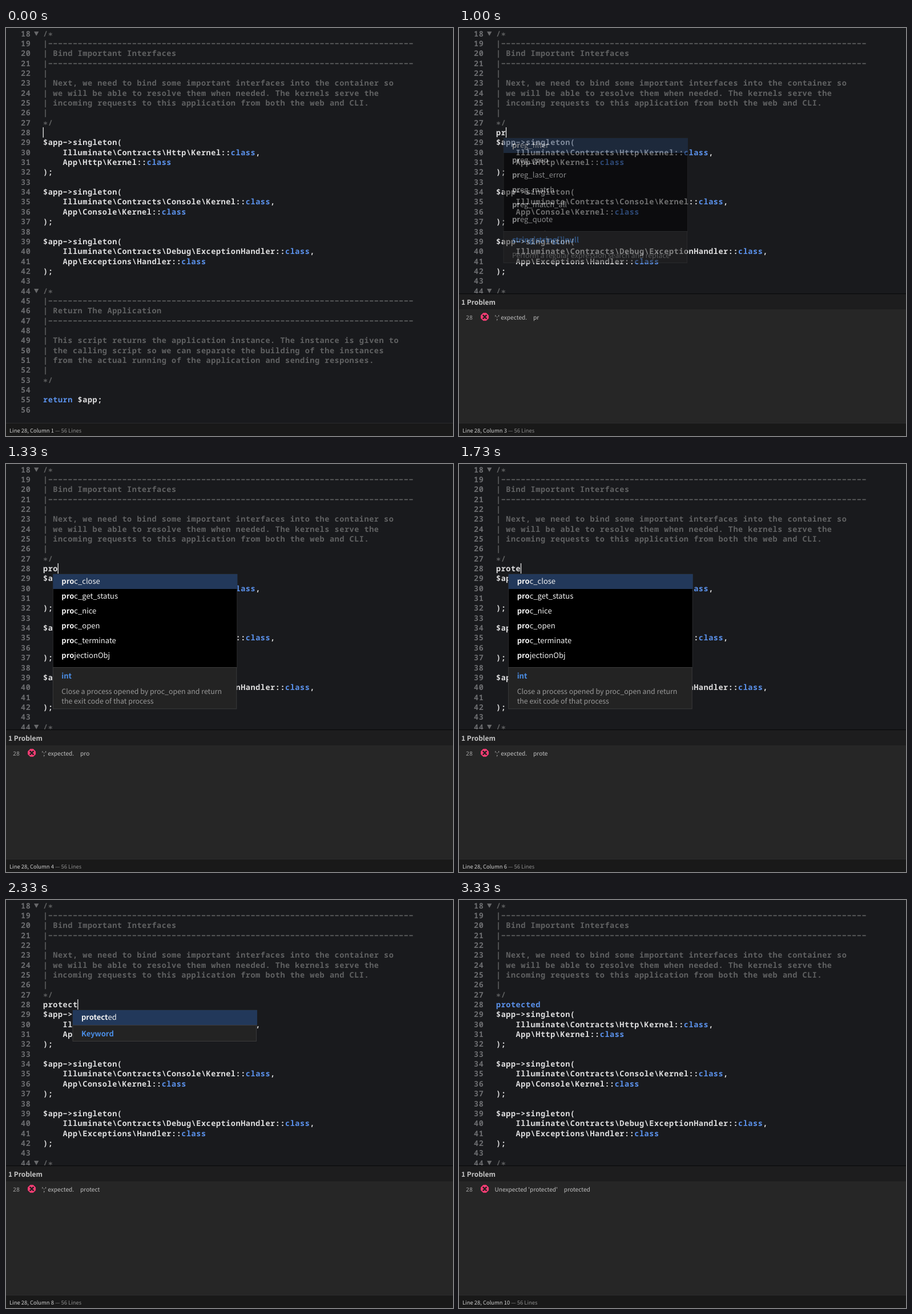
Recreate the animation shown at these times as an HTML page. Size 783x715 px, loop 3870 ms.

```html
<!DOCTYPE html>
<html lang="en">
<head>
<meta charset="utf-8">
<style>
  html, body { margin: 0; width: 100%; height: 100%; overflow: hidden; background: #191a1d; }
  svg { display: block; }
  text { white-space: pre; text-rendering: geometricPrecision; font-family: "Noto Sans CJK JP", "Noto Sans CJK SC", "Noto Sans", sans-serif; }
  .code { font: 600 13.5px "Noto Sans Mono", "DejaVu Sans Mono", monospace; letter-spacing: .554px; fill: #dededf; }
  .num { fill: #6c6d70; }
  .com { fill: #606162; }
  .key { fill: #5b92ec; }
  .item { font-size: 13px; fill: #f2f2f2; }
  .type { font-size: 13px; font-weight: 600; fill: #4a8ee6; }
  .doc { font-size: 12.36px; fill: #989898; }
  .head { font-size: 11.9px; font-weight: 600; fill: #c6c6c6; }
  .msg { font-size: 10.15px; fill: #c0c0c0; }
  .row { font: 10px "Noto Sans Mono", monospace; fill: #a0a0a0; }
  .stat { font-size: 9.43px; fill: #cfcfcf; }
  .dim { fill: #8c8c8c; }
  .b { font-weight: 700; }
</style>
</head>
<body>
<svg id="stage" width="783" height="715" viewBox="0 0 783 715">
  <g id="code"></g><g id="typed"></g><g id="panel"></g><g id="status"></g><g id="popup"></g>
</svg>
<script>
const LOOP = 3870, LEFT = 65, CHAR = 8.654, PITCH = 17.34, FIRST = 18;
const WORD = 'protected';
const rule = '|' + '-'.repeat(74);
const source = String.raw`/*
${rule}
| Bind Important Interfaces
${rule}
|
| Next, we need to bind some important interfaces into the container so
| we will be able to resolve them when needed. The kernels serve the
| incoming requests to this application from both the web and CLI.
|
*/

$app->singleton(
    Illuminate\Contracts\Http\Kernel::class,
    App\Http\Kernel::class
);

$app->singleton(
    Illuminate\Contracts\Console\Kernel::class,
    App\Console\Kernel::class
);

$app->singleton(
    Illuminate\Contracts\Debug\ExceptionHandler::class,
    App\Exceptions\Handler::class
);

/*
${rule}
| Return The Application
${rule}
|
| This script returns the application instance. The instance is given to
| the calling script so we can separate the building of the instances
| from the actual running of the application and sending responses.
|
*/

return $app;
`.split('\n');

const lists = {
  preg: {
    items: ['preg_filter', 'preg_grep', 'preg_last_error', 'preg_match', 'preg_match_all', 'preg_quote', 'preg_replace'],
    type: 'string|string[]|null',
    doc: ['Perform a regular expression search and replace']
  },
  proc: {
    items: ['proc_close', 'proc_get_status', 'proc_nice', 'proc_open', 'proc_terminate', 'projectionObj', 'property_exists'],
    type: 'int',
    doc: ['Close a process opened by proc_open and return', 'the exit code of that process']
  },
  word: { items: [WORD], type: 'Keyword', doc: [] }
};

// Each step changes part of the state: typed letters, reported letters, popup list, popup column, bold letters
const steps = [
  [0, { typed: 0, said: 0, list: '', at: 2, bold: 2, alpha: 1, caret: 1 }],
  [330, { caret: 0 }],
  [730, { typed: 1, caret: 1 }],
  [930, { typed: 2 }],
  [1000, { said: 2, list: 'preg', alpha: .5 }],
  [1070, { alpha: .9 }],
  [1130, { alpha: 1 }],
  [1270, { typed: 3 }],
  [1330, { said: 3, list: 'proc', at: 2.5, bold: 3 }],
  [1400, { at: 3 }],
  [1530, { typed: 4 }],
  [1600, { said: 4 }],
  [1670, { typed: 5 }],
  [1730, { said: 5 }],
  [1800, { list: 'word', at: 4, bold: 4 }],
  [1870, { at: 4.5 }],
  [1930, { typed: 6, at: 5, bold: 5 }],
  [2000, { said: 6 }],
  [2070, { at: 5.5, bold: 6 }],
  [2130, { at: 6 }],
  [2200, { typed: 7 }],
  [2270, { said: 7 }],
  [2330, { at: 6.5, bold: 7 }],
  [2400, { at: 7 }],
  [2600, { typed: 8 }],
  [2670, { said: 8 }],
  [2730, { bold: 8 }],
  [2800, { typed: 9, at: 7.6, bold: 9 }],
  [2870, { list: '', said: 9 }],
  [3330, { caret: 0 }]
];

const put = (id, html) => document.getElementById(id).innerHTML = html;
const text = (x, y, style, str) => `<text x="${x}" y="${y}" class="${style}">${str}</text>`;
const span = (style, str) => `<tspan class="${style}">${str}</tspan>`;
const rect = (x, y, w, h, fill, more = '') => `<rect x="${x}" y="${y}" width="${w}" height="${h}" fill="${fill}" ${more}/>`;
const lineY = n => 14.7 + (n - FIRST) * PITCH;
// Long dashes and centred stars, as the editor font draws them
const glyphs = line => line.replace(/-/g, '\u2212').replace(/\*/g, '\u2217');

function drawCode() {
  put('code', source.map((line, i) => {
    const y = lineY(FIRST + i), comment = /^[|/*]/.test(line), shape = glyphs(line);
    const body = comment ? shape : shape.replace(/\b(class|return)\b/g, span('key', '$1'));
    const fold = line === '/*' ? `<path d="M49 ${y - 8.5}h8.4l-4.2 7.6z" fill="#68696b"/>` : '';
    return text(26, y, 'code num', FIRST + i) + fold + text(LEFT, y, comment ? 'code com' : 'code', body);
  }).join(''));
}

function drawTyped({ typed, caret }) {
  put('typed', text(LEFT, lineY(28), typed === WORD.length ? 'code key' : 'code', WORD.slice(0, typed))
    + (caret ? rect(LEFT - .4 + typed * CHAR, 174, 1.3, 18, '#e6e6e6') : ''));
}

function drawPanel({ said }) {
  if (!said) return put('panel', '');
  const done = said === WORD.length, word = WORD.slice(0, said);
  const message = done ? `Unexpected '${WORD}'` : "';' expected.";
  put('panel', rect(0, 465, 783, 1.5, '#0b0b0c') + rect(0, 466.5, 783, 27, '#1d1d1e') + rect(0, 493, 783, 200, '#262626')
    + text(4, 485, 'head', '1 Problem') + text(12, 511, 'row', '28')
    + '<path d="M42.4 499.8h5.4l3.8 3.8v5.2l-3.8 3.8h-5.4l-3.8-3.8v-5.2z" fill="#f53d74" stroke="#f53d74" stroke-linejoin="round"/>'
    + '<path d="M42.5 503.6l5.2 5.2m0-5.2l-5.2 5.2" stroke="#1e1e1e" stroke-width="2.4" stroke-linecap="round"/>'
    + text(62.5, 511, 'msg', `${message}<tspan dx="11">${word}</tspan>`));
}

function drawStatus({ typed }) {
  put('status', rect(0, 692, 783, 23, '#191919') + rect(0, 692, 783, 1, '#2b2b2c')
    + text(6, 708.5, 'stat', `Line 28, Column ${typed + 1}` + span('dim', ' — 56 Lines')));
}

function drawPopup({ list, at, bold, alpha }) {
  if (!list) return put('popup', '');
  const { items, type, doc } = lists[list];
  const top = 193, row = 26, x = LEFT + at * CHAR - 4.3;
  const split = items.length > 1 ? 357 : 220;
  const height = 28 + (doc.length ? 9.5 + doc.length * 17.5 : 0);
  put('popup', `<g opacity="${alpha}">`
    + rect(x, top, 322.5, split - top, '#000', 'stroke="#2b2c2e"') + rect(x, top, 323, row, '#22385a')
    + items.map((s, i) => text(x + 15, top + 17 + i * row, 'item', span('b', s.slice(0, bold)) + s.slice(bold))).join('')
    + rect(x, split - .5, 321.5, height, '#232323', 'stroke="#3a3a3b"')
    + text(x + 15, split + 18.5, 'type', type)
    + doc.map((s, i) => text(x + 15, split + 46 + i * 17.4, 'doc', s)).join('')
    + '</g>');
}

let shown = -1;
function tick(now) {
  const t = now % LOOP;
  const past = steps.filter(([at]) => at <= t);
  if (past.length !== shown) {
    shown = past.length;
    const state = Object.assign({}, ...past.map(s => s[1]));
    [drawTyped, drawPanel, drawStatus, drawPopup].forEach(draw => draw(state));
  }
  requestAnimationFrame(tick);
}

drawCode();
tick(0);
</script>
</body>
</html>
```
